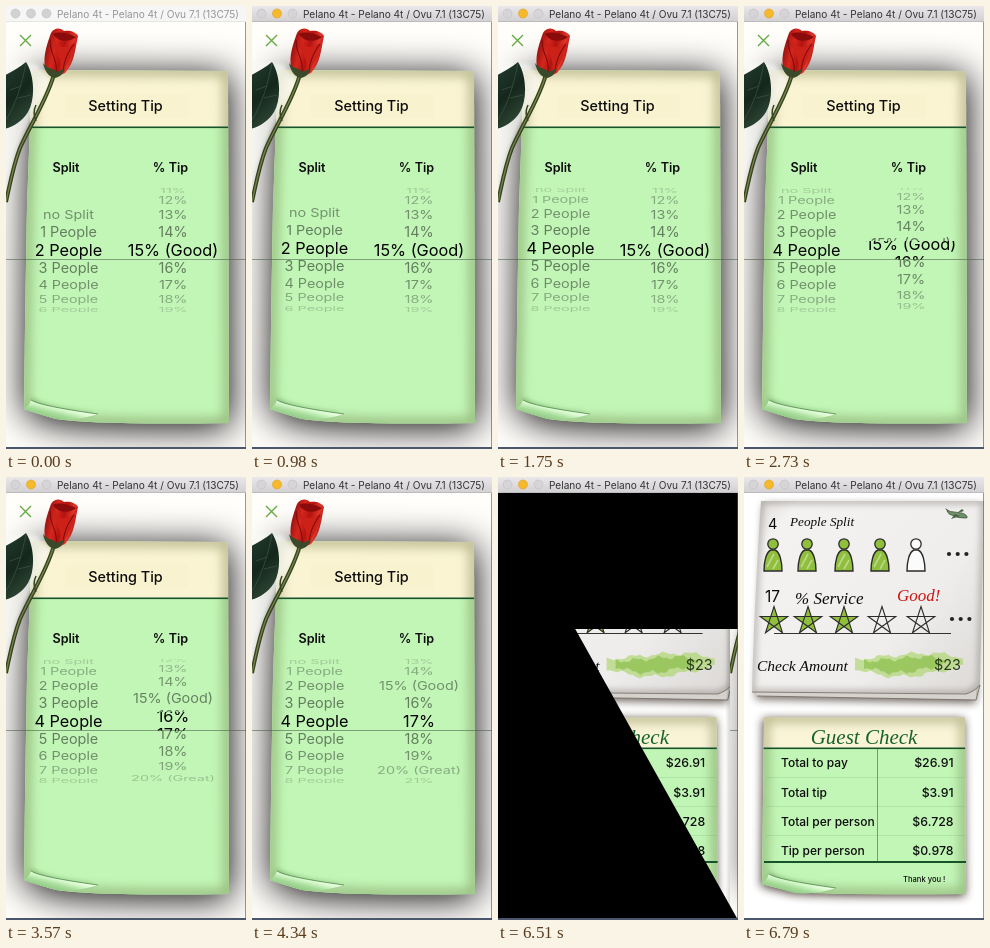
An HTML page with a canvas that plays this animation: 240x443 px, repeating every 8 s.

```html
<!DOCTYPE html>
<html lang="en">
<head>
<meta charset="utf-8">
<title>Tip picker</title>
<style>
html, body { margin: 0; width: 100%; height: 100%; overflow: hidden; background: #fff; }
canvas { display: block; width: 240px; height: 443px; }
</style>
</head>
<body>
<canvas id="stage"></canvas>
<script>
const W = 240, H = 443, LOOP = 8000, STEP = 70;
const canvas = document.getElementById('stage');
const dpr = window.devicePixelRatio || 1;
canvas.width = W * dpr;
canvas.height = H * dpr;
const c = canvas.getContext('2d');
const SANS = 'Inter, Roboto, sans-serif';
const SCRIPT = '"Liberation Serif", "Noto Serif", serif';
const GREEN = '#c2f6b7', LINE = '#17532a', INK = '#0c0c0c', LIME = '#8fbf3c';

// [time, value] tables
const LEFT = [[910, 2], [1050, 2.25], [1260, 3.2], [1470, 3.9], [1750, 4.12], [2030, 4.12], [2240, 4.03], [2380, 4]];
const RIGHT = [[2660, 5], [2730, 5.33], [2940, 5.95], [3080, 6.1], [3500, 6.1], [3780, 6.8], [3990, 6.8], [4200, 6.96], [4340, 7]];
const SLIDE = [[6160, 0], [6230, .108], [6300, .42], [6370, .7], [6440, .88], [6510, .967], [6580, .992], [6650, 1]];

const SPLITS = ['no Split', ...Array.from({ length: 11 }, (_, i) => i + 1 + ' People')];
const NOTES = { 15: ' (Good)', 20: ' (Great)' };
const TIPS = Array.from({ length: 16 }, (_, i) => i + 10 + '%' + (NOTES[i + 10] || ''));

function at(keys, t) {
  if (t <= keys[0][0]) return keys[0][1];
  for (let i = 1; i < keys.length; i++) {
    const [t0, a] = keys[i - 1], [t1, b] = keys[i];
    if (t <= t1) return a + (b - a) * (t - t0) / (t1 - t0);
  }
  return keys[keys.length - 1][1];
}

function text(s, x, y, size, { color = INK, align = 'left', weight = 400, family = SANS, italic = false } = {}) {
  c.font = `${italic ? 'italic ' : ''}${weight} ${size}px ${family}`;
  c.fillStyle = color;
  c.textAlign = align;
  c.fillText(s, x, y + size * .364);
}

function rect(x, y, w, h, color) {
  c.fillStyle = color;
  c.fillRect(x, y, w, h);
}

function shape(d, fill, stroke, width = 1) {
  const p = new Path2D(d);
  if (fill) { c.fillStyle = fill; c.fill(p); }
  if (stroke) { c.strokeStyle = stroke; c.lineWidth = width; c.stroke(p); }
}

function disc(x, y, r, fill, stroke, width = 1) {
  c.beginPath();
  c.arc(x, y, r, 0, 7);
  if (fill) { c.fillStyle = fill; c.fill(); }
  if (stroke) { c.strokeStyle = stroke; c.lineWidth = width; c.stroke(); }
}

function gradient(x0, y0, x1, y1, ...stops) {
  const g = c.createLinearGradient(x0, y0, x1, y1);
  stops.forEach(([p, color]) => g.addColorStop(p, color));
  return g;
}

function shadowed(color, blur, x, y, draw) {
  c.save();
  c.shadowColor = color;
  c.shadowBlur = blur * dpr;
  c.shadowOffsetX = x * dpr;
  c.shadowOffsetY = y * dpr;
  draw();
  c.restore();
}

function clipped(path, draw) {
  c.save();
  c.clip(new Path2D(path));
  draw();
  c.restore();
}

function soft(blur, draw) {
  c.save();
  c.filter = `blur(${blur * dpr}px)`;
  draw();
  c.restore();
}

function note(outline, top, split, headColor) {
  clipped(outline, () => {
    rect(0, top, W, split - top, headColor);
    rect(0, split, W, H - split, GREEN);
    soft(6, () => shape(outline, null, 'rgba(75,85,25,.42)', 9));
    rect(0, split - .5, W, 1.6, LINE);
  });
}

function curl(y) {
  c.save();
  c.translate(0, y);
  soft(2, () => shape('M24 -4Q40 6 84 11L88 14L26 6Z', 'rgba(60,120,50,.35)'));
  shape('M25 -1Q34 5 92 13Q72 20 50 18Q32 13 18 8Q23 5 25 -1Z',
    gradient(40, 2, 36, 18, [0, '#ecffe4'], [.2, '#d3f7c9'], [.5, '#a6dc99'], [1, '#86bd7b']));
  shape('M25 -1Q34 5 92 13', null, '#4f8a48', .8);
  c.restore();
}

function rose() {
  // pale backing on the outer side of the stem
  soft(2, () => shape('M-6 56L30 58L44 72C38 92 22 117 11 142C5 158 2 172 -6 190Z', 'rgba(250,249,245,.7)'));
  const stem = 'M48 68C42 92 25 117 14 142C7 160 4 178 0 196';
  shape(stem, null, '#34431f', 4);
  shape(stem, null, '#77824a', 1.3);
  shape('M30 115C27 108 28 103 30 99', null, '#34431f', 1.5);
  shape('M20 56C28 68 30 92 22 106C16 116 5 122 -2 123V70C5 66 13 62 20 56Z',
    gradient(0, 70, 28, 100, [0, '#1f3529'], [.5, '#15271c'], [1, '#29402f']));
  shape('M20 57C16 78 10 98 0 114M15 80L4 84M12 92L25 89', null, '#3a513f', .8);
  shape('M45 27C49 21 55 22 58 25C64 24 70 26 72 30C69 43 69 56 59 67C52 71 43 69 39 61C37 50 41 38 45 27Z',
    gradient(39, 40, 71, 48, [0, '#8f100e'], [.3, '#d5261d'], [.55, '#b3130f'], [.8, '#e0352a'], [1, '#a8120f']));
  shape('M47 28C53 25 62 27 70 31C64 36 53 37 47 28Z', '#8a0b0b');
  shape('M45 30C49 42 60 44 69 36C66 50 62 60 54 67C58 53 47 45 45 30Z', '#cb2119');
  shape('M44 34C44 48 52 54 50 67M68 38C62 46 58 54 57 66', null, '#730a0a', 1);
  shape('M37 57C42 63 47 62 51 66L59 62C57 68 54 71 49 72C43 71 39 66 37 57Z', '#39492a');
}

function wheel(items, pos, x) {
  const R = 66, turn = 16 * Math.PI / 180, mid = 244;
  const rows = (big) => items.forEach((label, i) => {
    const a = (i - pos) * turn;
    if (Math.abs(a) > 1.3) return;
    const k = Math.cos(a);
    c.save();
    c.translate(x, mid + R * Math.sin(a));
    c.scale(1, k);
    c.globalAlpha = big ? 1 : .52 * k ** 1.3;
    text(label, 0, 0, big ? 16.3 : 14.4, { align: 'center', color: '#000' });
    c.restore();
  });
  clipped('M0 182H240V235H0ZM0 254H240V306H0Z', () => rows(false));
  clipped('M0 235H240V254H0Z', () => rows(true));
}

function pickerPage(t) {
  const paper = 'M26 64L222 65L223 417Q90 419 50 413Q32 408 18 403Q19 300 21 200Z';
  rect(0, 16, W, H, '#fffefb');
  shadowed('rgba(0,0,0,.98)', 36, 1, 4, () => shape(paper, GREEN));
  note(paper, 64, 121, '#faf4d3');
  rect(59, 88, 123, 24, 'rgba(246,238,200,.4)');
  curl(395);
  rose();
  shape('M14 29L25 40M25 29L14 40', null, '#62a83f', 1.3);
  text('Setting Tip', 119.5, 100, 14.4, { align: 'center', weight: 500 });
  text('Split', 60, 161, 12.6, { align: 'center', weight: 600 });
  text('% Tip', 164.5, 161, 12.6, { align: 'center', weight: 600 });
  wheel(SPLITS, at(LEFT, t), 62.5);
  wheel(TIPS, at(RIGHT, t), 167);
  rect(0, 253, W, 1, 'rgba(70,90,70,.55)');
}

function person(x, fill) {
  const body = `M${x - 9} 94C${x - 9} 85 ${x - 7} 75 ${x - 2} 73H${x + 2}C${x + 7} 75 ${x + 9} 85 ${x + 9} 94Z`;
  shape(body, fill, '#2b2b2b', 1.4);
  disc(x, 67, 5.2, fill, '#2b2b2b', 1.3);
  shape(`M${x - 6} 90L${x + 1} 77M${x} 92L${x + 5} 83`, null, 'rgba(255,255,255,.4)', 1.6);
}

function star(x, y, r, fill) {
  const tip = (i) => {
    const a = -Math.PI / 2 + i * Math.PI * .8;
    return `${x + r * Math.cos(a)} ${y + r * Math.sin(a)}`;
  };
  shape('M' + [0, 1, 2, 3, 4].map(tip).join('L') + 'Z', fill, '#2b2b2b', 1.1);
}

function dots(x, y) {
  for (let i = 0; i < 3; i++) disc(x + i * 8.7, y, 2.1, '#222');
}

// Two translucent layers with a wavy outline
function brush() {
  const layer = (x0, x1, thick, color) => {
    const side = (s) => Array.from({ length: 30 }, (_, i) => {
      const u = s < 0 ? i / 29 : 1 - i / 29;
      const body = thick * Math.sin(Math.PI * (.08 + .84 * u)) ** .7;
      const wave = 1.6 * Math.sin(u * 23 + s) + Math.sin(u * 61 + s * 2);
      return `${x0 + (x1 - x0) * u} ${187 + 2 * Math.sin(u * 5) + s * body + wave}`;
    });
    soft(.7, () => shape('M' + [...side(-1), ...side(1)].join('L') + 'Z', color));
  };
  layer(111, 219, 11, 'rgba(165,212,95,.6)');
  layer(120, 202, 7, 'rgba(120,180,45,.5)');
}

function card() {
  const tone = gradient(10, 24, 235, 215, [0, '#dedbd8'], [.12, '#f3f2f1'], [.65, '#efeeed'], [1, '#dcd9d6']);
  shadowed('rgba(50,35,25,.7)', 8, 0, 3, () => shape('M20 25H238L232 223L12 219Z', '#d6d2ce'));
  const sheet = 'M17 24H240L236 208Q231 214 222 217L8 215Q10 130 17 24Z';
  shape(sheet, tone);
  clipped(sheet, () => soft(3, () => shape(sheet, null, 'rgba(80,70,62,.35)', 6)));
  shape('M8 215L222 217Q231 214 236 208', null, '#877e78', 1.1);
  shape('M13 219L232 223L236 208', null, '#80756e', 1);
}

function plane() {
  shape('M203 34L218 36Q224 38 223 41Q214 42 205 37Z', '#6f8f69', '#44563f', .7);
  shape('M203 34L201 31L206 34ZM211 37L207 42L216 39ZM213 36L218 32L220 34Z', '#4a6346');
}

function checkPage() {
  const script = (s, x, y, size, color = INK, align = 'left') =>
    text(s, x, y, size, { color, align, family: SCRIPT, italic: true });
  rect(0, 16, W, H, '#fff');
  card();
  plane();
  text('4', 24, 47, 14.5);
  script('People Split', 46, 44, 13.2);
  [29, 63, 100, 136, 172].forEach((x, i) => person(x, i < 4 ? LIME : '#fbfbfb'));
  dots(205, 77);
  text('17', 21, 119, 15.5);
  script('% Service', 51, 121, 17);
  script('Good!', 153, 118, 17, '#cc1512');
  [30, 64, 100, 138, 177].forEach((x, i) => star(x, 144, 14.5, i < 3 ? LIME : null));
  dots(208, 142);
  rect(30, 156, 177, 1, '#333');
  script('Check Amount', 13, 188, 15.5);
  brush();
  text('$23', 217, 188, 14.4, { align: 'right', color: '#263a18' });

  const paper = 'M20 240H221L222 417Q90 418 50 415Q32 411 18 407Q19 320 20 240Z';
  shadowed('rgba(45,30,20,.85)', 10, -1, 2, () => shape(paper, GREEN));
  note(paper, 240, 271, '#fbf5d8');
  rect(20, 384, 202, 2, LINE);
  rect(133, 272, 1, 112, 'rgba(50,105,55,.6)');
  [300, 329, 358].forEach((y) => rect(22, y, 199, 1, 'rgba(90,150,90,.18)'));
  script('Guest Check', 120, 259, 21, '#17632f', 'center');
  [['Total to pay', '$26.91'], ['Total tip', '$3.91'], ['Total per person', '$6.728'], ['Tip per person', '$0.978']]
    .forEach(([label, sum], i) => {
      const y = 286 + i * 29.2;
      text(label, 37, y, 12, { weight: 500 });
      text(sum, 209.5, y, 12.3, { align: 'right', weight: 500 });
    });
  curl(398);
  text('Thank you !', 159, 402, 7.6, { weight: 500 });
}

function shifted(x, draw) {
  c.save();
  c.translate(x, 0);
  c.beginPath();
  c.rect(0, 16, W, H);
  c.clip();
  draw();
  c.restore();
}

function wipe(t) {
  const n = (t - 6230) / STEP;
  const top = 64 + 22 * n, low = Math.min(H, 384 + 15 * n);
  const edge = (y) => (y - 14) * .5595;
  shape(`M0 16H240V${top}H${edge(top)}L${edge(low)} ${low}H0Z`, '#000');
}

function titleBar(active) {
  rect(0, 0, W, 16, active ? gradient(0, 0, 0, 16, [0, '#e9e7e9'], [1, '#d1cfd1']) : '#f6f6f6');
  rect(0, 15.3, W, .7, active ? '#b5b3b5' : '#dedede');
  [9.5, 25, 40.5].forEach((x, i) => {
    const lit = active && i === 1;
    disc(x, 7.5, 4.5, lit ? '#f6b92c' : active ? '#d6d4d6' : '#d2d2d2', lit ? '#dc9f22' : '#c2c0c2', .6);
  });
  text('Pelano 4t - Pelano 4t / Ovu 7.1 (13C75)', 142, 8, 10.1,
    { align: 'center', color: active ? '#343434' : '#969696' });
}

function draw(t) {
  c.setTransform(dpr, 0, 0, dpr, 0, 0);
  const p = at(SLIDE, t);
  if (p > 0) {
    shifted(-72 * (1 - p), checkPage);
    if (p < 1) rect(0, 16, W, H, `rgba(0,0,0,${.1 * (1 - p)})`);
  }
  if (p < 1) {
    const x = W * p;
    if (p > 0) rect(x - 5, 16, 5, H, gradient(x - 5, 0, x, 0, [0, 'rgba(0,0,0,0)'], [1, 'rgba(0,0,0,.15)']));
    shifted(x, () => pickerPage(t));
  }
  if (t >= 6230 && t < 6790) wipe(t);
  rect(239, 16, 1, H, 'rgba(70,85,110,.6)');
  rect(0, 441, W, 2, '#4a566c');
  titleBar(t >= 840);
}

let shown = -1;
function frame(now) {
  const t = Math.floor((now % LOOP) / STEP) * STEP;
  if (t !== shown) draw(shown = t);
  requestAnimationFrame(frame);
}
draw(0);
requestAnimationFrame(frame);
</script>
</body>
</html>
```
